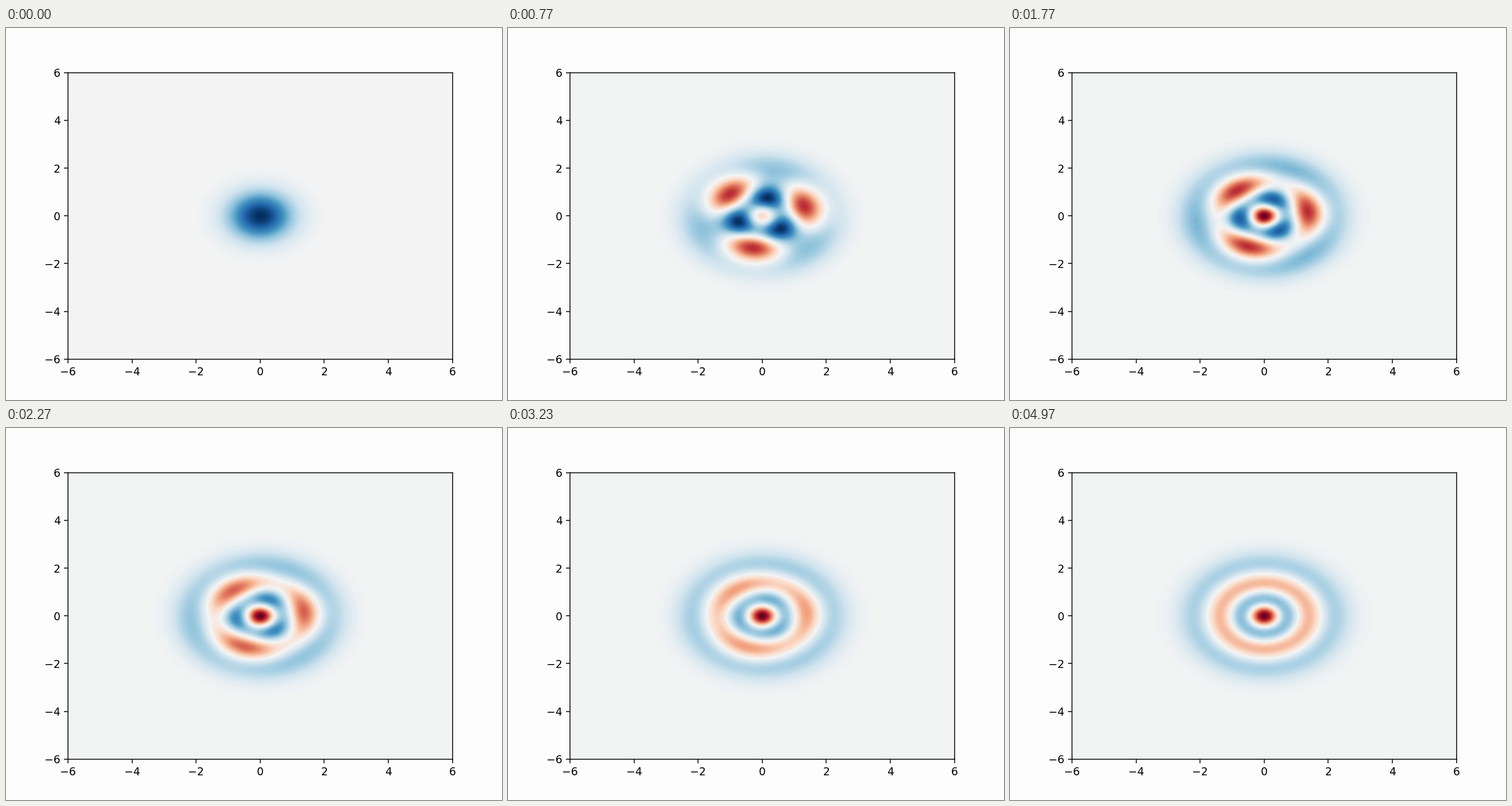
A matplotlib script that plays this animation: 864x648 px, repeating every 5010 ms.

```python
import numpy as np
import matplotlib.pyplot as plt
from matplotlib.animation import FuncAnimation
from matplotlib.ticker import MaxNLocator

FRAMES, LOOP = 150, 5010
LIM = 6
PAPER = 253 / 255

fig, ax = plt.subplots(figsize=(6.4, 4.8), dpi=135, facecolor=(PAPER,) * 3)

# Wigner functions of |0> and |3> and of their coherence, in units of 1/pi
x, y = np.meshgrid(np.linspace(-LIM, LIM, 671), np.linspace(-LIM, LIM, 499))
u = 2 * (x**2 + y**2)
envelope = np.exp(-u / 2)
w_vacuum = envelope
w_three = -envelope * (1 - 3 * u + 1.5 * u**2 - u**3 / 6)
w_cross = 2 * envelope * u**1.5 / np.sqrt(6)
angle = 3 * np.arctan2(y, x)

cmap = plt.get_cmap("RdBu")
locator = MaxNLocator(101, min_n_ticks=1)


def wigner(t):
    """State sin(e)|0> + cos(e)|3> at t seconds."""
    rate = 0.80 + 0.088 * (t - 2.35) ** 2
    e = np.pi / 2 * np.exp(-rate * t)
    a, b = np.sin(e), np.cos(e)
    phase = np.radians(24.5 + 78 * np.exp(-1.75 * t**2))
    w = a * a * w_vacuum + b * b * w_three
    return (w - a * b * w_cross * np.cos(angle - phase)) / np.pi


def shade(w):
    """Filled contour bands, coloured symmetrically about zero."""
    top = np.abs(w).max()
    levels = locator.tick_values(w.min(), w.max())
    step = levels[1] - levels[0]
    band = (np.floor(w / step) + 0.5) * step
    return cmap(0.5 + 0.5 * np.clip(band / top, -1, 1))[..., :3] * PAPER


image = ax.imshow(shade(wigner(0)), origin="lower", aspect="auto",
                  extent=(-LIM, LIM, -LIM, LIM))
ticks = range(-LIM, LIM + 1, 2)
ax.set(xticks=ticks, yticks=ticks, xlim=(-LIM, LIM), ylim=(-LIM, LIM))


def update(i):
    image.set_data(shade(wigner(i * LOOP / FRAMES / 1000)))
    return [image]


anim = FuncAnimation(fig, update, frames=FRAMES, interval=LOOP / FRAMES,
                     repeat=True, repeat_delay=0)
plt.show()
```
